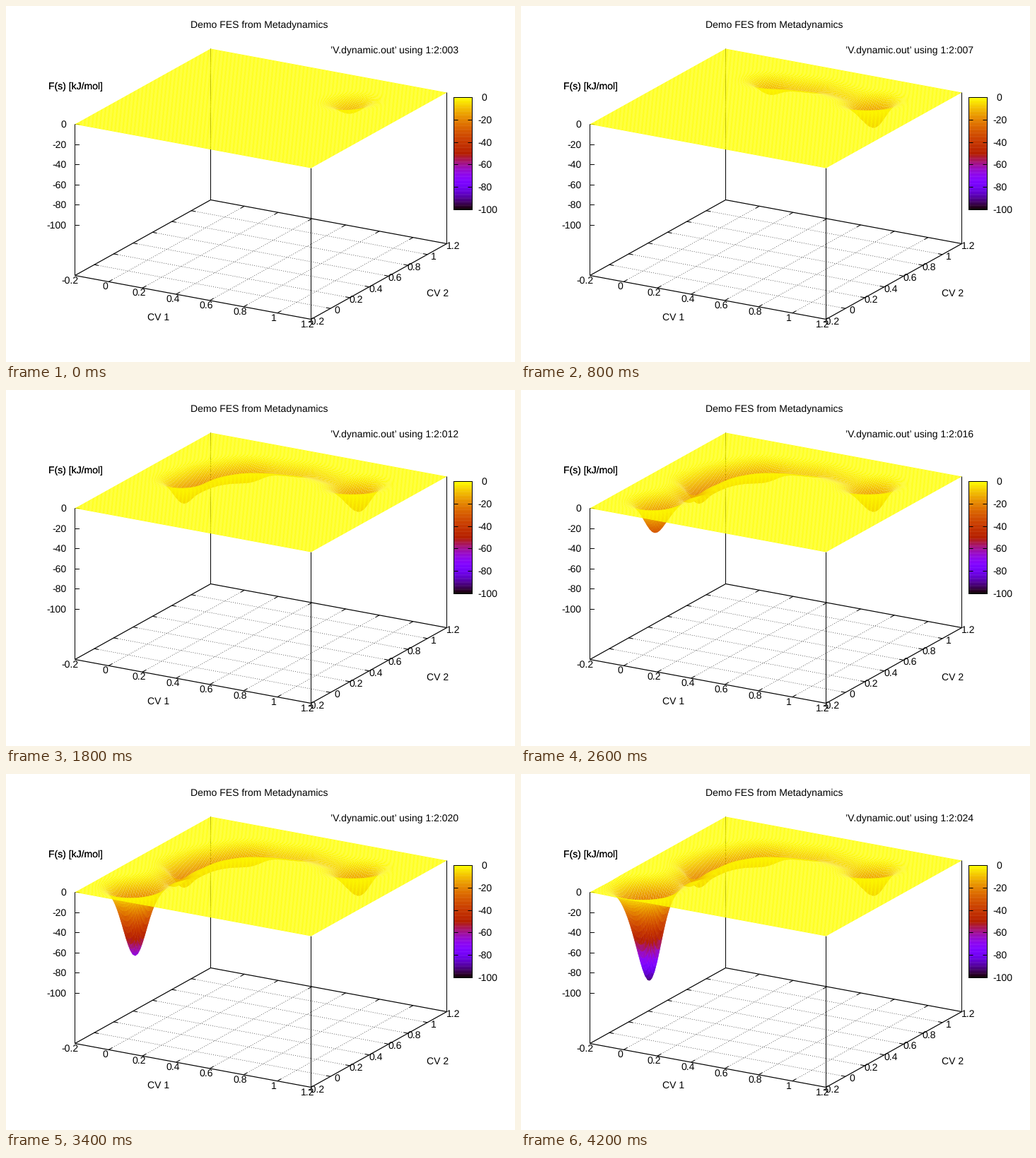
Write a matplotlib script that moves like this. It is 720 px wide and 504 px high and loops after 4800 ms.

```python
import numpy as np
import matplotlib.pyplot as plt
from matplotlib.animation import FuncAnimation
from matplotlib.collections import LineCollection, PolyCollection

W, H, DPI = 720, 504, 100
PX = 72 / DPI            # points per pixel
FRAMES, STEPS = 24, 22   # the last picture is held for three ticks
N = 140                  # cells per side of the surface
ZPX = 1.43               # pixels per kJ/mol

# Corner and edge vectors of the plot box, in stage pixels.
ORIGIN = np.array([97.0, 167.0])
EDGE1 = np.array([334.0, 62.0])
EDGE2 = np.array([192.0, -107.0])
DROP = np.array([0.0, 214.0])

# The walker drops hills of one size along a path given by (step, x, y),
# then circles in the last basin with a growing radius.
PATH = np.array([
    (0, 474, 137), (1, 508, 131), (2, 500, 136), (3, 428, 113), (4, 362, 106),
    (5, 334, 104), (7, 280, 113), (9, 248, 126), (9.8, 246, 127), (10, 241, 138),
    (10.6, 238, 139), (11, 214, 149), (12, 196, 155), (13, 180, 158), (14, 192, 157),
]).T
BASIN = 14               # step at which the circling starts
PER_STEP = 4
HEIGHT = 3.8
SIGMA = np.array([13.75, 4.42])

plt.rcParams["font.family"] = "Liberation Sans"
plt.rcParams["text.hinting"] = "none"
fig = plt.figure(figsize=(W / DPI, H / DPI), dpi=DPI, facecolor="white")
ax = fig.add_axes([0, 0, 1, 1])
ax.set_xlim(-0.5, W - 0.5)
ax.set_ylim(H - 0.5, -0.5)
ax.axis("off")


def palette(z):
    """Black-violet-red-yellow map of -100..0."""
    t = np.clip(1 + np.asarray(z) / 100, 0, 1)
    blue = np.clip(np.sin(2 * np.pi * t), 0, 1)
    return np.stack([np.sqrt(t), t ** 3, blue], axis=-1)


def segments(segs, width=1.0, z=1, **kw):
    ax.add_collection(LineCollection(segs, colors="black", linewidths=width * PX,
                                     snap=False, zorder=z, **kw))


def label(x, y, s, ha="center"):
    """Text whose capitals are centred on y."""
    return ax.text(x, y + 4.5, s, ha=ha, va="baseline", size=14 * PX,
                   color="black", zorder=5)


def base(u, v):
    return ORIGIN + DROP + u * EDGE1 + v * EDGE2


def draw_box():
    corners = [base(0, 0), base(1, 0), base(1, 1), base(0, 1)]
    segments(list(zip(corners, corners[1:] + corners[:1])), 1.2)
    segments([(c, c - DROP) for c in corners])

    inner = np.arange(1, 7) / 7
    grid = [(base(k, 0), base(k, 1)) for k in inner]
    grid += [(base(0, k), base(1, k)) for k in inner]
    segments(grid, 0.55, linestyles=[(0, (1 / 0.55, 2 / 0.55))])

    tick1 = 6 * EDGE1 / np.hypot(*EDGE1)
    tick2 = 6 * EDGE2 / np.hypot(*EDGE2)
    ticks = []
    for k in inner:
        ticks += [(base(k, 0), base(k, 0) + tick2), (base(k, 1), base(k, 1) - tick2),
                  (base(0, k), base(0, k) + tick1), (base(1, k), base(1, k) - tick1)]
    segments(ticks)

    for i in range(8):
        s = f"{round(0.2 * (i - 1), 1):g}"
        shift = 2 if i else 0        # room kept for a sign
        x, y = base(i / 7, 0)
        label(x - 6.8 + shift, y + 6.5, s)
        x, y = base(1, i / 7)
        label(x + 7 + shift, y + 2.5, s)

    for z in range(0, -101, -20):
        y = round(ORIGIN[1] - ZPX * z)
        segments([((97, y), (103.5, y))])
        label(85, y, str(z), "right")


def draw_colorbar():
    left, right, top, bottom = 633, 659, 129, 288
    edges = np.linspace(top, bottom, 129)
    rects = [[(left, a), (right, a), (right, b + 0.5), (left, b + 0.5)]
             for a, b in zip(edges, edges[1:])]
    ax.add_collection(PolyCollection(rects, facecolors=palette(np.linspace(0, -100, 128)),
                                     edgecolors="none", linewidths=0, snap=False, zorder=2))
    segments([[(left, top), (right, top), (right, bottom), (left, bottom), (left, top)]], z=3)
    for z in range(0, -101, -20):
        y = round(top - z * (bottom - top) / 100)
        segments([((left, y), (left + 6, y)), ((right - 6, y), (right, y))], z=3)
        label(667 if z else 672, y, str(z), "left")


draw_box()
draw_colorbar()
label(357.5, 26.5, "Demo FES from Metadynamics")
label(215.5, 439.5, "CV 1")
label(610, 405.5, "CV 2")
for _ in range(2):       # overprinted, so it looks heavier
    label(97.5, 113.5, "F(s) [kJ/mol]")
key = label(639.5, 62.5, "", "right")

# Surface nodes from the far edge to the near one.
u, v = np.meshgrid(np.linspace(0, 1, N + 1), np.linspace(1, 0, N + 1))
flat = ORIGIN + u[..., None] * EDGE1 + v[..., None] * EDGE2


def quads(a):
    """The four corners of every cell, in drawing order."""
    cells = np.stack([a[:-1, :-1], a[:-1, 1:], a[1:, 1:], a[1:, :-1]], axis=2)
    return cells.reshape(N * N, 4, *a.shape[2:])


def walker(t):
    """Place of the walker on the projected zero plane."""
    if t < BASIN:
        return np.array([np.interp(t, PATH[0], row) for row in PATH[1:]])
    s = t - BASIN
    angle = 2.4 * s * PER_STEP
    ring = (0.5 + 0.14 * s) * np.array([np.cos(angle), np.sin(angle)])
    return np.array([180 - 1.6 * s, 159 + 0.3 * s]) + ring * SIGMA


def hill(t):
    d = (flat - walker(t)) / SIGMA
    return HEIGHT * np.exp(-(d ** 2).sum(axis=-1) / 2)


# Surface height after each step.
dug = [sum(hill(step + k / PER_STEP) for k in range(PER_STEP)) for step in range(STEPS)]
heights = -np.cumsum(dug, axis=0)

surface = PolyCollection(quads(flat), edgecolors="none", linewidths=0, zorder=2)
ax.add_collection(surface)


def draw(frame):
    now = min(frame, STEPS - 1)
    z = heights[now]
    nodes = flat.copy()
    nodes[..., 1] -= ZPX * z
    surface.set_verts(quads(nodes))
    surface.set_facecolor(palette(quads(z).mean(axis=1)))
    key.set_text(f"\u2019V.dynamic.out\u2019 using 1:2:{now + 3:03d}")
    return surface, key


anim = FuncAnimation(fig, draw, frames=FRAMES, interval=200, repeat=True,
                     repeat_delay=0, blit=False)
plt.show()
```
